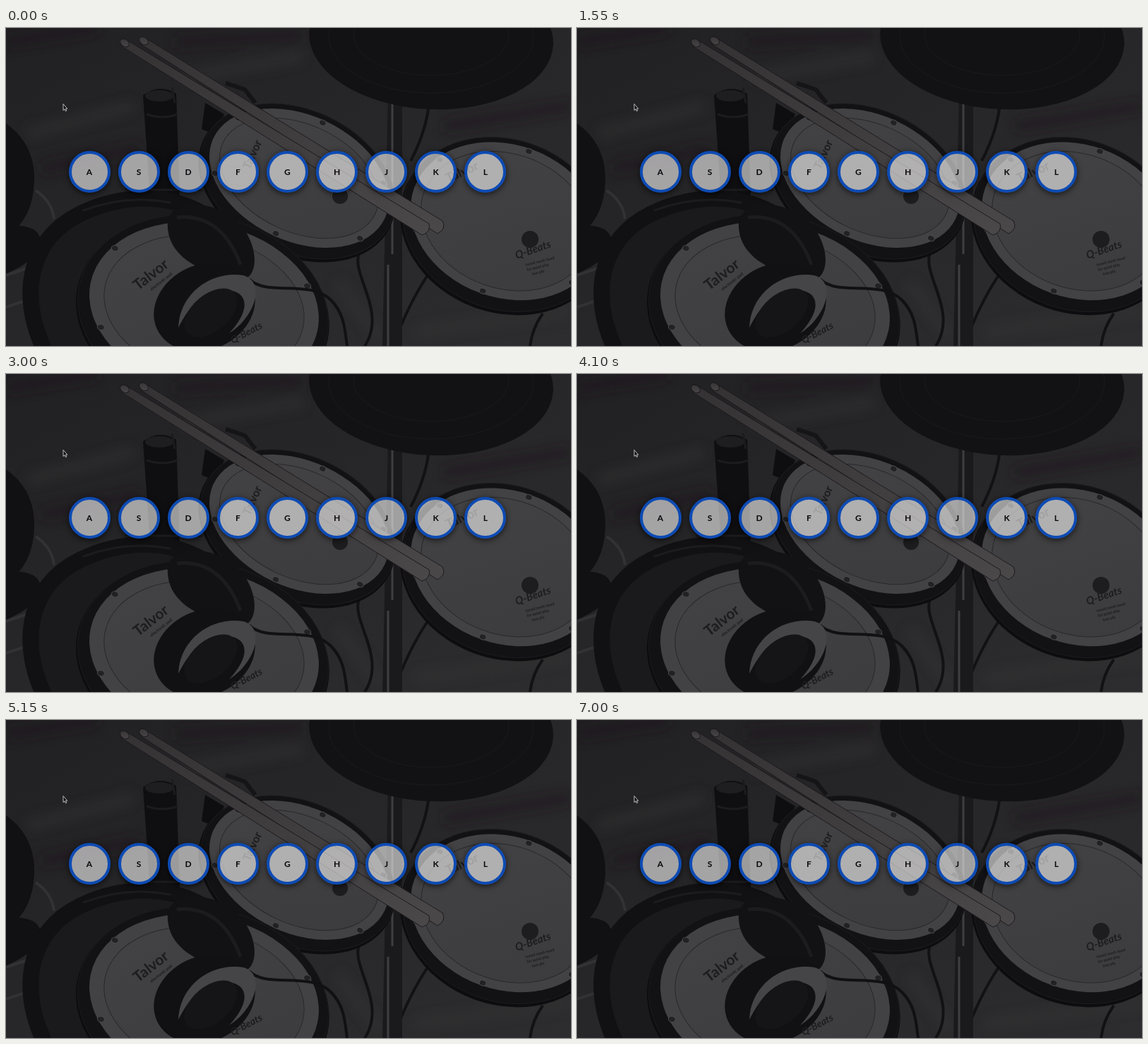
Write an HTML page that moves like this. It is 800 px wide and 450 px high and loops after 7.05 s.

```html
<!DOCTYPE html>
<html lang="en">
<head>
<meta charset="utf-8">
<title>Drum keys</title>
<style>
  html, body { margin: 0; width: 100%; height: 100%; overflow: hidden; background: #262527; }
  #stage { position: absolute; left: 0; top: 0; width: 800px; height: 450px; overflow: hidden; }
  #stage > svg { position: absolute; left: 0; top: 0; }
  .key {
    position: absolute; top: 174px; width: 59px; height: 59px; box-sizing: border-box;
    border: 4px solid #0d4bb4; border-radius: 50%; background: rgba(255, 255, 255, .59);
    font: 700 12px/51px Lato, sans-serif; text-align: center; color: #08080a;
  }
</style>
</head>
<body>
<div id="stage">
<svg width="800" height="450" viewBox="0 0 800 450">
  <defs>
    <linearGradient id="floor" x1="0" y1="0" x2="1" y2="1">
      <stop offset="0" stop-color="#212022"/>
      <stop offset=".5" stop-color="#272628"/>
      <stop offset="1" stop-color="#2d2c2e"/>
    </linearGradient>
    <linearGradient id="head" x1="0" y1="0" x2="1" y2="1">
      <stop offset="0" stop-color="#434244"/>
      <stop offset="1" stop-color="#3b3a3c"/>
    </linearGradient>
    <linearGradient id="wood" x1="0" y1="0" x2="1" y2="1">
      <stop offset="0" stop-color="#353234"/>
      <stop offset="1" stop-color="#4b484a"/>
    </linearGradient>
    <filter id="soft"><feGaussianBlur stdDeviation="8"/></filter>
    <filter id="lens"><feGaussianBlur stdDeviation=".6"/></filter>
  </defs>
  <rect width="800" height="450" fill="url(#floor)"/>
  <g fill="none" stroke-width="16" filter="url(#soft)" opacity=".5">
    <path stroke="#353436" d="M30 150 180 110M250 70 420 40M580 430 800 400M470 360 530 440"/>
    <path stroke="#1a191b" d="M0 20 130 0M240 20 420 10M50 200 190 170M620 140 800 110"/>
  </g>
  <g filter="url(#lens)">
    <path d="M598 114Q593 150 573 188M597 350Q570 390 548 450M500 318C488 350 540 400 508 450M760 404Q745 425 742 450"
      fill="none" stroke="#121113" stroke-width="4"/>
    <path d="M541 95h20v355h-28z" fill="#1a191b"/>
    <path d="M547 98V320M541 335V450" stroke="#3f3e40" stroke-width="3"/>
    <ellipse cx="602" cy="15" rx="173" ry="100" transform="rotate(3 602 15)" fill="#121113"/>
    <g fill="none" stroke="#1a191b">
      <ellipse cx="602" cy="12" rx="145" ry="80"/>
      <ellipse cx="602" cy="9" rx="110" ry="58"/>
    </g>
    <path d="M0 135Q42 165 40 218T0 296zM0 280Q45 276 49 300T0 348z" fill="#111012"/>
    <path d="M42 230Q65 245 68 270M0 350 35 338 30 385 0 395" fill="none" stroke="#323133" stroke-width="4"/>
    <path d="M194 95Q218 78 241 93L246 240H204z" fill="#0f0e10"/>
    <ellipse cx="217" cy="96" rx="20" ry="8" fill="#1e1d1f"/>
    <path d="M199 122Q222 130 243 122M235 84l4 22M168 229h110" fill="none" stroke="#1c1b1d" stroke-width="3"/>
    <path d="M282 106 309 122 296 151 277 143z" fill="#0e0d0f"/>
    <path d="M311 78 338 87 353 106" fill="none" stroke="#151416" stroke-width="6"/>
    <path d="M52 450C20 380 30 300 105 263 170 232 245 232 300 278L250 450z" fill="#1a191b"/>

    <g id="drums"></g>

    <g fill="none" stroke="#111012" stroke-linecap="round">
      <path d="M52 450C20 380 30 300 105 263 170 232 245 232 300 278" stroke-width="23"/>
      <path d="M110 258Q170 235 232 247" stroke="#1c1b1d" stroke-width="3"/>
      <path d="M345 356C370 380 430 355 460 385 480 405 480 430 483 450" stroke-width="4"/>
    </g>
    <path d="M229 273C238 235 310 246 338 286 357 315 357 350 335 357 290 350 225 330 229 273z" fill="#121113"/>
    <path d="M242 268Q305 262 332 335" fill="none" stroke="#1c1b1d" stroke-width="5"/>
    <ellipse cx="281" cy="395" rx="74" ry="60" transform="rotate(-25 281 395)" fill="#111012"/>
    <path d="M244 424C246 374 292 343 336 350 367 358 355 407 316 432 346 400 344 374 315 371 278 368 258 397 244 424z" fill="#454446"/>
    <ellipse cx="290" cy="403" rx="44" ry="26" transform="rotate(-40 290 403)" fill="#151416"/>

    <g fill="url(#wood)" stroke="#1c1a1c" stroke-width="1">
      <path d="M191 23 197 14 618 273Q624 284 611 291z"/>
      <path d="M164 26 171 17 599 277Q602 289 589 293z"/>
      <ellipse cx="168" cy="21" rx="7" ry="5" transform="rotate(35 168 21)"/>
      <ellipse cx="195" cy="18" rx="7" ry="5" transform="rotate(35 195 18)"/>
    </g>

    <g fill="#1d1c1e" font-family="Lato, sans-serif" font-weight="700">
      <text transform="translate(187 372) rotate(-38)" font-size="21">Talvor</text>
      <text transform="translate(206 372) rotate(-38)" font-size="6">electronic pad</text>
      <text transform="translate(345 201) rotate(-66)" font-size="16">Talvor</text>
      <text transform="translate(626 219) rotate(-24)" font-size="18">Talvor</text>
      <circle cx="742" cy="299" r="12"/>
      <text transform="translate(723 327) rotate(-19)" font-size="15" font-style="italic">Q-Beats</text>
      <g font-size="5.5">
        <text transform="translate(736 337) rotate(-14)">tuned mesh head</text>
        <text transform="translate(738 344) rotate(-14)">for quiet play</text>
        <text transform="translate(745 350) rotate(-14)">two ply</text>
      </g>
      <circle cx="473" cy="238" r="11"/>
      <text transform="translate(321 447) rotate(-28)" font-size="14" font-style="italic">Q-Beats</text>
    </g>
  </g>
  <path d="M81 107.5v9l2-1.8 1.4 3 1.4-.7-1.3-2.8h2.3z" fill="#111" stroke="#d0d0d0" stroke-width=".9"/>
</svg>
</div>
<script>
const LOOP = 7050, SWING = 150;
const stage = document.getElementById('stage');

// Drum: centre, radii, tilt, rim width; the head sits higher than the shell
const drums = [[413, 217, 146, 103, 25, 10], [706, 278, 150, 122, 20, 10], [279, 401, 181, 137, 12, 14]];
const ring = (x, y, rx, ry, fill, line = 'none') =>
  `<ellipse cx="${x}" cy="${y}" rx="${rx}" ry="${ry}" fill="${fill}" stroke="${line}"/>`;

document.getElementById('drums').innerHTML = drums.map(([x, y, rx, ry, tilt, w]) => {
  const top = y - w * .5, hx = rx - w * 1.2, hy = ry - w * 1.4;
  let lugs = '';
  for (let i = 0; i < 6; i++) {
    const a = i * Math.PI / 3 + .5;
    lugs += ring(x + (hx - 4) * Math.cos(a), top + (hy - 4) * Math.sin(a), 5, 4, '#222123', '#4c4b4d');
  }
  return `<g transform="rotate(${tilt} ${x} ${y})">` +
    ring(x, y + 3, rx, ry, '#0d0c0e') +
    ring(x, y, rx - 2, ry - 2, '#121113', '#1c1b1d') +
    ring(x, top, hx, hy, '#424143') +
    ring(x, top, hx - w * 1.5, hy - w * 1.3, 'url(#head)', '#29282a') + lugs + '</g>';
}).join('');

const keys = [...'ASDFGHJKL'].map((letter, i) => {
  const el = document.createElement('div');
  el.className = 'key';
  el.textContent = letter;
  el.style.left = 88.5 + 70.1 * i + 'px';
  stage.append(el);
  return { letter, el };
});

const hits = [['A', 690], ['S', 1235], ['D', 1840], ['F', 4100], ['G', 4590],
  ['J', 4850], ['K', 5170], ['L', 5720], ['L', 6150]];
const clamp = v => Math.min(1, Math.max(0, v));
const ease = v => 1 - (1 - v) ** 2 * (1 - v * v);
// Swells to full size, then swings back at once
const press = dt => ease(clamp(dt / SWING)) - ease(clamp(dt / SWING - 1));

function draw(now) {
  const t = now % LOOP;
  for (const { letter, el } of keys) {
    const p = Math.max(0, ...hits.filter(h => h[0] === letter).map(h => press(t - h[1])));
    el.style.transform = `scale(${1 + .46 * p})`;
    el.style.zIndex = p > 0 ? 1 : 0;
    el.style.boxShadow = `0 0 ${11 * p}px ${3 * p}px rgba(22,168,232,${p}), 0 2px 8px rgba(0,0,0,${.65 * (1 - p)})`;
  }
  requestAnimationFrame(draw);
}
draw(performance.now());
</script>
</body>
</html>
```
